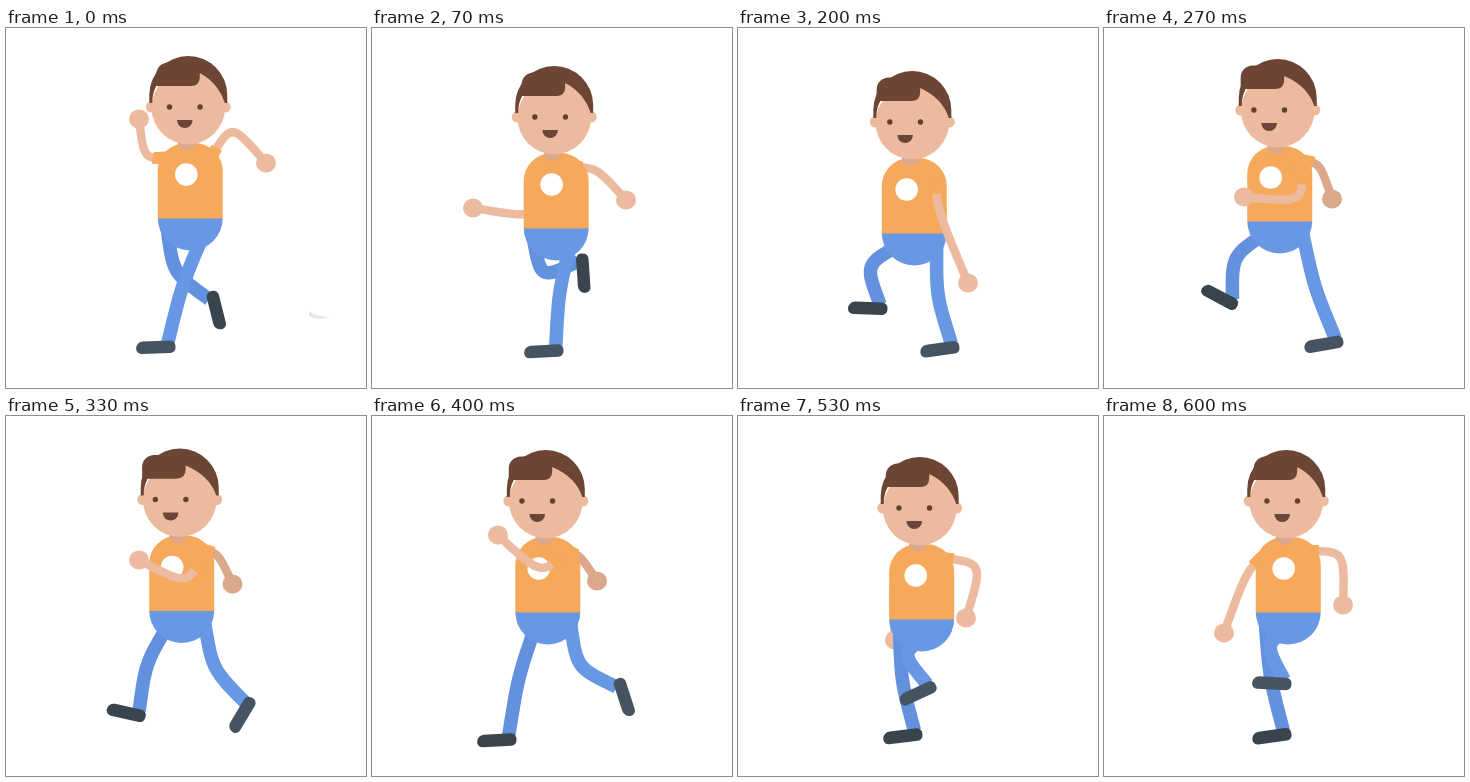
Write an HTML page with a canvas that moves like this. It is 360 by 360 pixels and loops after 670 ms.

```html
<!DOCTYPE html>
<html lang="en">
<head>
<meta charset="utf-8">
<title>Runner</title>
<style>
html, body { margin: 0; width: 100%; height: 100%; overflow: hidden; background: #fff; }
canvas { display: block; width: 360px; height: 360px; }
</style>
</head>
<body>
<canvas id="stage" width="360" height="360"></canvas>
<script>
const g = document.getElementById('stage').getContext('2d');
const LOOP = 670, STEPS = 10;
const SKIN = '#ecbb9f', SHADE = '#dba88b', HAIR = '#6d4535', SHIRT = '#f6a95b',
      JEANS = '#6898e4', EYE = '#623f30', MOUTH = '#6b443a';

// Key poses of the stride; the steps between them are blended.
const KEYS = [0, 1, 3, 4, 6, 8, 9];
const bob = [[28], [38], [43], [31], [34], [41], [34]];
// hand x, y, elbow bend
const nearHand = [[260, 135, 36], [254, 172, 10], [230, 255, -9], [140, 169, 38],
                  [126, 119, 30], [228, 202, 36], [239, 189, 30]];
const farHand = [[133, 91, 22], [101, 180, 48], [185, 190, 0], [228, 171, 14],
                 [225, 165, 6], [157, 224, -10], [120, 217, -10]];
// shoe x, y, tilt in degrees
const nearShoe = [[150, 319, -2], [172, 323, -3], [202, 321, -8], [220, 316, -10],
                  [252, 281, -108], [180, 277, -25], [168, 267, 3]];
const farShoe = [[210, 282, -104], [211, 245, -94], [130, 280, 2], [116, 269, 28],
                 [125, 324, -3], [165, 320, -7], [168, 320, -8]];

function at(track, step) {
  const k = KEYS.findLastIndex(s => s <= step);
  const next = track[(k + 1) % KEYS.length];
  const u = (step - KEYS[k]) / ((KEYS[k + 1] ?? STEPS) - KEYS[k]);
  return track[k].map((v, n) => v + (next[n] - v) * u);
}

function oval(x, y, rx, ry, color, end = Math.PI * 2) {
  g.fillStyle = color;
  g.beginPath();
  g.ellipse(x, y, rx, ry, 0, 0, end);
  g.fill();
}

function box(x, y, w, h, radii, color) {
  g.fillStyle = color;
  g.beginPath();
  g.roundRect(x, y, w, h, radii);
  g.fill();
}

// Rubber limb from a to b, pulled sideways by bend; part is how much is drawn.
function limb(a, b, along, bend, width, color, part = 1) {
  const dx = b[0] - a[0], dy = b[1] - a[1], len = Math.hypot(dx, dy);
  const joint = [a[0] + dx * along + dy / len * bend, a[1] + dy * along - dx / len * bend];
  g.strokeStyle = color;
  g.lineWidth = width;
  g.beginPath();
  for (let n = 0; n <= 24; n++) {
    const t = part * n / 24, s = 1 - t;
    const mix = k => s ** 3 * a[k] + 3 * s * t * joint[k] + t ** 3 * b[k];
    g.lineTo(mix(0), mix(1));
  }
  g.stroke();
}

function arm(shoulder, [x, y, bend], sleeve, color) {
  limb(shoulder, [x, y], 0.3, bend, 8.5, color);
  oval(x, y, 10, 9.5, color);
  limb(shoulder, [x, y], 0.3, bend, 12, SHIRT, sleeve);
}

function leg(hip, [x, y, tilt], color, shoe) {
  const r = tilt * Math.PI / 180, c = Math.cos(r), s = Math.sin(r);
  const ankle = [x + 12 * c + 4 * s, y + 12 * s - 4 * c];
  const slack = 112 - Math.hypot(ankle[0] - hip[0], ankle[1] - hip[1]);
  limb(hip, ankle, 0.5, -Math.min(33, Math.max(5, slack * 0.6)), 13.5, color);
  g.save();
  g.translate(x, y);
  g.rotate(r);
  box(-20, -6, 39.5, 12.5, [8, 6, 6, 6], shoe);
  g.restore();
}

function head(top, x, gaze) {
  const eyeY = top + 51, tip = gaze + 15;
  for (const side of [-1, 1]) oval(x + side * 37, eyeY, 5.5, 5.5, SKIN);
  oval(x, top + 51.5, 36.8, 36.8, SKIN);

  g.fillStyle = HAIR;
  g.beginPath();
  g.moveTo(x - 39, top + 47);
  g.arc(x, top + 39, 39, Math.PI, 0);
  g.lineTo(x + 39, top + 47);
  g.lineTo(x + 36.5, top + 47);
  g.quadraticCurveTo(x + 30, top + 27, tip, top + 17);
  g.lineTo(tip, top + 21);
  g.quadraticCurveTo(tip, top + 30, tip - 9, top + 30);
  g.lineTo(x - 32, top + 30);
  g.quadraticCurveTo(x - 36, top + 37, x - 36, top + 47);
  g.fill();
  box(gaze - 28.5, top + 6.5, 40, 23.5, [12, 0, 6, 3], HAIR);

  for (const side of [-1, 1]) oval(gaze + side * 15.3, eyeY, 2.7, 2.7, EYE);
  oval(gaze, top + 64, 7.8, 8, MOUTH, Math.PI);
}

function draw(step) {
  const phase = step / STEPS * Math.PI * 2;
  const turn = Math.tanh(3 * Math.cos(phase + 0.13));
  const inFront = turn < 0;
  const [top] = at(bob, step);
  const x = 178 + 4.3 * turn, mid = x + 2;
  const gaze = x - 6.3 + 2.8 * Math.cos(phase);
  const waist = top + 162.5, shoulderY = top + 101;
  const swing = () =>
    arm([mid + 21, shoulderY], at(nearHand, step), inFront ? 0.25 : 0.1, SKIN);

  g.fillStyle = '#fff';
  g.fillRect(0, 0, 360, 360);

  arm([mid - 20 * turn, shoulderY], at(farHand, step), 0.3, inFront ? SHADE : SKIN);
  leg([mid - 17 - 6 * turn, waist + 10], at(farShoe, step), '#6391dd', '#39444f');
  leg([mid + 19 - 4 * turn, waist + 12], at(nearShoe, step), JEANS, '#465462');
  if (!inFront) swing();

  oval(mid, waist - 0.5, 32.5, 32.5, JEANS, Math.PI);
  box(mid - 32.5, top + 87, 65, waist - top - 87, [28, 28, 0, 0], SHIRT);
  oval(x - 1.5, top + 88, 9, 6.5, SHADE);
  oval(gaze + 1.5, top + 118.5, 11.3, 11.3, '#fff');
  head(top, x, gaze);
  if (inFront) swing();

  // fleck on the ground
  if (step === 0) {
    g.fillStyle = '#eee4de';
    g.beginPath();
    g.moveTo(303, 283);
    g.quadraticCurveTo(311, 289, 324, 289);
    g.quadraticCurveTo(311, 293, 303, 288);
    g.fill();
  }
}

// Steps begin on whole hundredths of a second.
const starts = Array.from({ length: STEPS }, (_, i) => Math.round(i * 6.66) * 10);
const begin = performance.now();
function tick() {
  const t = (performance.now() - begin) % LOOP;
  draw(starts.findLastIndex(s => s <= t));
  requestAnimationFrame(tick);
}
tick();
</script>
</body>
</html>
```
